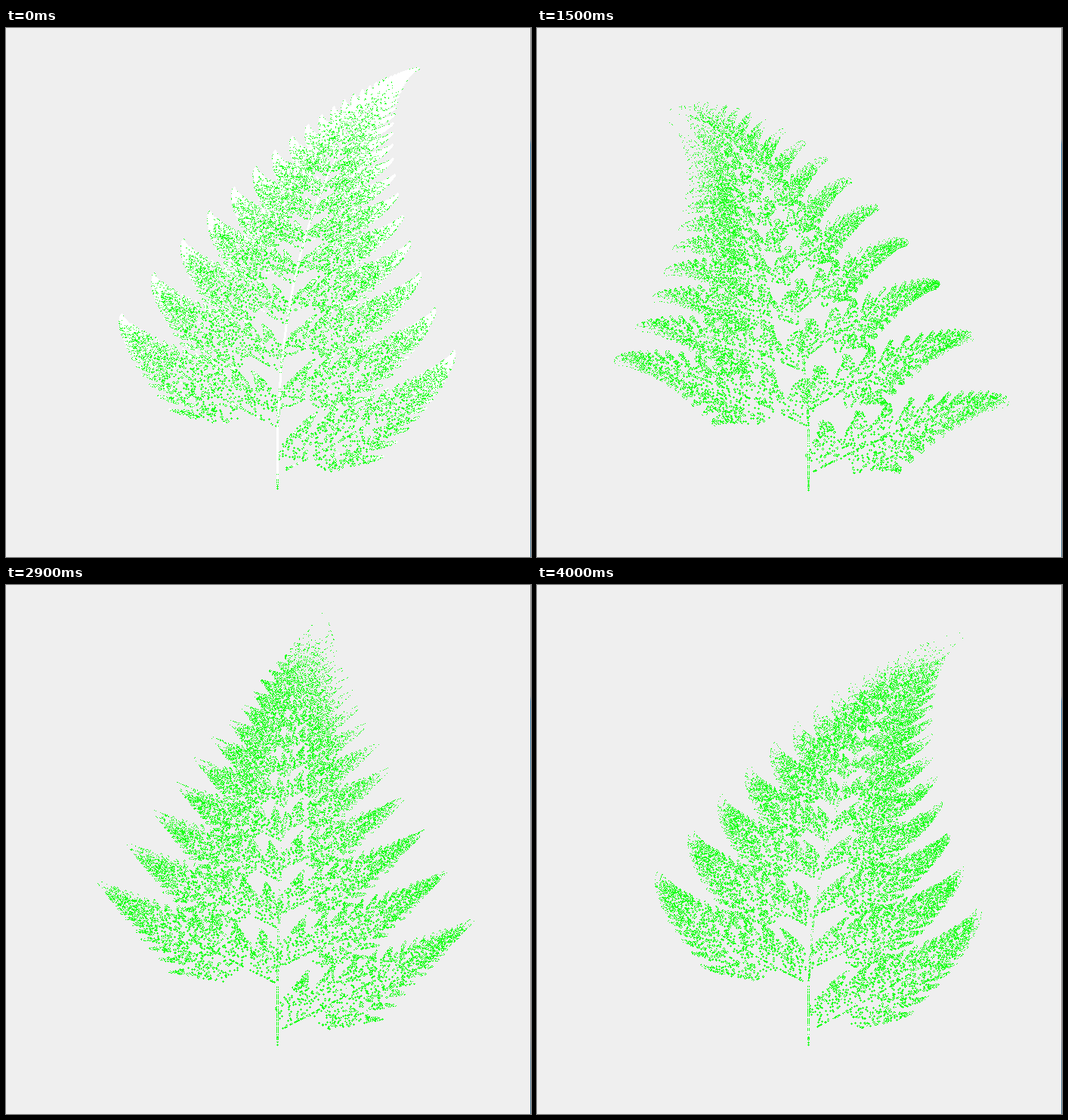
Animation of 695x701 px, one loop 4.1 s. Source, as an HTML page with a canvas:

```html
<!DOCTYPE html>
<html lang="en">
<head>
<meta charset="utf-8">
<title>Swaying fern</title>
<style>
  html, body { margin: 0; width: 100%; height: 100%; overflow: hidden; background: #efefef; }
  canvas { display: block; }
</style>
</head>
<body>
<canvas id="stage" width="695" height="701"></canvas>
<script>
const W = 695, H = 701;
const TICK = 100, TICKS = 41, STATES = 36;
const HOLDS = [4, 13, 21, 30, 39];      // ticks on which the picture rests
const POINTS = 30000;
const ORIGIN = { x: 359, y: 615 }, SCALE = { x: 90, y: 54 };
const DOT = [0, -1, 1, -W, W];          // a dot is a small plus
const BG = 0, GREEN = 1, WHITE = 2;
const COLORS = [[239, 239, 239], [30, 255, 30], [255, 255, 255]];

const ctx = document.getElementById('stage').getContext('2d');
const image = ctx.createImageData(W, H);
const pixels = new Uint32Array(image.data.buffer);
const palette = COLORS.map(([r, g, b]) => (255 << 24 | b << 16 | g << 8 | r) >>> 0);

function randomFrom(seed) {
  return () => {
    seed = (seed + 0x6D2B79F5) | 0;
    let t = Math.imul(seed ^ (seed >>> 15), 1 | seed);
    t = (t + Math.imul(t ^ (t >>> 7), 61 | t)) ^ t;
    return ((t ^ (t >>> 14)) >>> 0) / 4294967296;
  };
}

// The bend swings between -0.045 and 0.045 in even steps.
function bendAt(state) {
  const d = Math.abs(state - 15);
  return 0.005 * (Math.min(d, STATES - d) - 9);
}

// Chaos game of the Barnsley fern; counts how often each pixel is hit.
function countHits(bend, random) {
  const hits = new Uint16Array(W * H);
  let x = 0, y = 0;
  for (let i = -30; i < POINTS; i++) {
    const r = random();
    if (r < 0.01) [x, y] = [0, 0.16 * y];
    else if (r < 0.86) [x, y] = [0.85 * x + bend * y, (0.04 - 2 * bend) * x + 0.85 * y + 1.6];
    else if (r < 0.93) [x, y] = [0.2 * x - 0.26 * y, 0.23 * x + 0.22 * y + 1.6];
    else [x, y] = [-0.15 * x + 0.28 * y, 0.26 * x + 0.24 * y + 0.44];
    if (i < 0) continue;
    const px = Math.floor(ORIGIN.x + SCALE.x * x + 0.5);
    const py = Math.floor(ORIGIN.y - SCALE.y * y);
    for (const step of DOT) hits[py * W + px + step]++;
  }
  return hits;
}

// Single hits are green; where dots overlap the previous picture shows through.
function drawFern(state, previous) {
  const hits = countHits(bendAt(state), randomFrom(state * 7919 + 11));
  return Uint8Array.from(hits, (n, i) =>
    n === 0 ? BG : n === 1 ? GREEN : previous ? previous[i] : WHITE);
}

const ferns = [];
for (let i = 0; i < STATES; i++) ferns.push(drawFern(i, ferns[i - 1]));

const edge = ctx.createLinearGradient(0, 0, 0, H);
[[0, '#8c8c8c'], [0.21, '#8c8c8c'], [0.22, '#2f6f9f'], [0.35, '#3f7598'],
 [0.45, '#8a8f94'], [0.84, '#8f8a8a'], [0.9, '#5b7d95'], [1, '#4a7590']]
  .forEach(([at, color]) => edge.addColorStop(at, color));

let shown = -1;
function render(time) {
  const tick = Math.floor(time / TICK) % TICKS;
  const state = tick - HOLDS.filter(h => h <= tick).length;
  if (state === shown) return;
  shown = state;
  const map = ferns[state];
  for (let i = 0; i < map.length; i++) pixels[i] = palette[map[i]];
  ctx.putImageData(image, 0, 0);
  ctx.fillStyle = edge;
  ctx.fillRect(W - 1, 0, 1, H);
}

const start = performance.now();
function loop() {
  render(performance.now() - start);
  requestAnimationFrame(loop);
}
loop();
</script>
</body>
</html>
```
